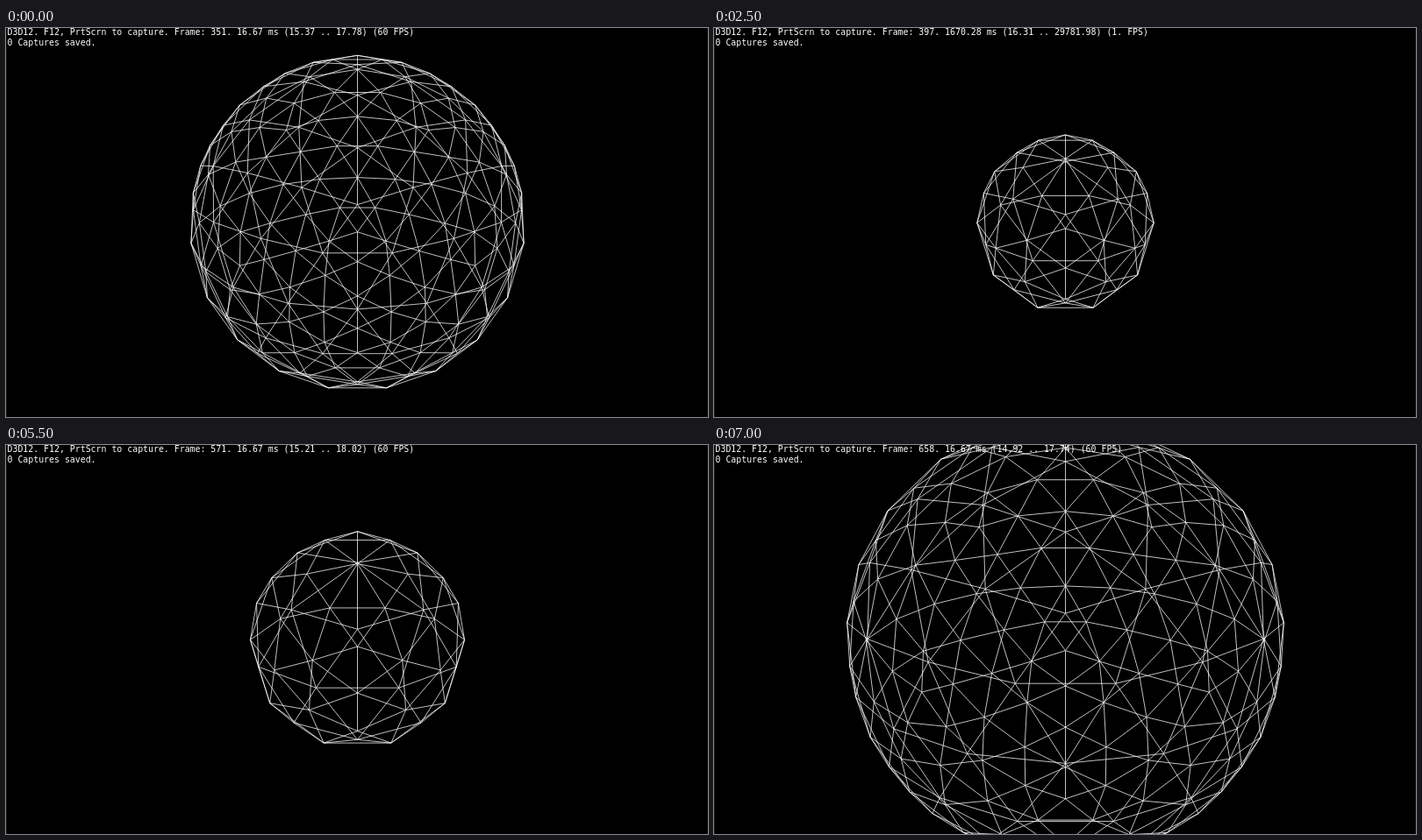
These frames come from a looping animation (800 by 444 pixels, 7100 ms). An HTML page with a canvas:

```html
<!DOCTYPE html>
<html>
<head>
<meta charset="utf-8">
<style>
html, body { margin: 0; width: 100%; height: 100%; overflow: hidden; background: #000; }
canvas { display: block; }
</style>
</head>
<body>
<canvas id="stage" width="800" height="444"></canvas>
<script>
const ctx = document.getElementById('stage').getContext('2d');
const LOOP = 7100, STEP = 100, FOCAL = 536, CX = 400.5, CY = 222.4, TILT = 0.077;

// Camera distance over time: [ms, distance]
const path = [
  [1711, 2.975], [1900, 3.607], [2700, 6.03], [3300, 9.54], [3550, 10], [4300, 8.62],
  [4800, 7.35], [5100, 6.02], [5900, 3.265], [6000, 3.18], [6500, 2.476], [6700, 2.37], [7000, 2.36]
];
// Timing readout, from the given frame count on
const stats = [
  [0, '16.67 ms (15.37 .. 17.78) (60 FPS)'],
  [352, '1670.28 ms (16.31 .. 29781.98) (1. FPS)'],
  [413, '16.41 ms (3.36 .. 17.70) (61. FPS)'],
  [474, '16.67 ms (15.00 .. 18.20) (60 FPS)'],
  [534, '16.67 ms (15.21 .. 18.02) (60 FPS)'],
  [594, '16.67 ms (15.43 .. 17.67) (60 FPS)'],
  [654, '16.67 ms (14.92 .. 17.74) (60 FPS)']
];

// Icosahedron with one vertex facing the viewer
const ring = (start, z) => Array.from({ length: 5 }, (_, k) => {
  const a = (start + 72 * k) * Math.PI / 180, r = 2 / Math.sqrt(5);
  return [r * Math.cos(a), r * Math.sin(a), z];
});
const front = ring(90, 1 / Math.sqrt(5)), back = ring(126, -1 / Math.sqrt(5));
const faces = [];
for (let k = 0; k < 5; k++) {
  const n = (k + 1) % 5;
  faces.push(
    [[0, 0, 1], front[k], front[n]], [[0, 0, -1], back[k], back[n]],
    [front[k], front[n], back[k]], [back[k], back[n], front[n]]
  );
}

// Unique edges of the sphere with each face side split into n parts
function buildEdges(n) {
  const edges = new Map();
  const add = (p, q) => {
    const key = [p, q].map(v => v.map(c => Math.round(c * 1e4) + 0).join()).sort().join('|');
    edges.set(key, [p, q]);
  };
  for (const [a, b, c] of faces) {
    const point = (i, j) => {
      const p = a.map((v, m) => v * (n - i - j) + b[m] * i + c[m] * j);
      const len = Math.hypot(...p);
      return p.map(v => v / len);
    };
    for (let i = 0; i < n; i++) {
      for (let j = 0; j < n - i; j++) {
        const p = point(i, j), q = point(i + 1, j), r = point(i, j + 1);
        add(p, q);
        add(q, r);
        add(r, p);
      }
    }
  }
  return [...edges.values()];
}
const levels = [1, 2, 4].map(buildEdges);

const slope = i => path[i] && path[i + 1]
  ? (path[i + 1][1] - path[i][1]) / (path[i + 1][0] - path[i][0]) : 0;

// Slope at a key, flat at turning points
function tangent(i) {
  const a = slope(i - 1), b = slope(i);
  return a * b > 0 ? 2 * a * b / (a + b) : i ? 0 : b;
}

function distance(t) {
  const last = path.length - 1;
  if (t <= path[0][0]) return path[0][1];
  if (t >= path[last][0]) return path[last][1];
  const i = path.findIndex(p => p[0] > t) - 1;
  const [t0, d0] = path[i], [t1, d1] = path[i + 1];
  const h = t1 - t0, u = (t - t0) / h, v = 1 - u;
  return v * v * (1 + 2 * u) * d0 + u * u * (3 - 2 * u) * d1
    + h * u * v * (v * tangent(i) - u * tangent(i + 1));
}

function project([x, y, z], d) {
  const c = Math.cos(TILT), s = Math.sin(TILT);
  const scale = FOCAL / (d - (z * c - y * s));
  return [CX + x * scale, CY - (y * c + z * s) * scale];
}

function drawSphere(d) {
  ctx.beginPath();
  for (const [p, q] of levels[Math.max(0, 2 - Math.floor(d / 3))]) {
    ctx.moveTo(...project(p, d));
    ctx.lineTo(...project(q, d));
  }
  ctx.stroke();
}

function draw(now) {
  const t = Math.floor(now % LOOP / STEP) * STEP;
  const frame = Math.max(351, Math.floor(362.95 + (t - 1900) * 0.0579));
  const timing = stats.filter(s => s[0] <= frame).pop()[1];
  ctx.fillStyle = '#000';
  ctx.fillRect(0, 0, 800, 444);
  ctx.strokeStyle = '#fff';
  ctx.lineWidth = 0.75;
  drawSphere(distance(t));
  // Faint window border
  ctx.fillStyle = '#1c1c1c';
  ctx.fillRect(0, 0, 1, 444);
  ctx.fillRect(799, 0, 1, 444);
  ctx.fillStyle = '#fff';
  ctx.font = '9.88px "DejaVu Sans Mono", monospace';
  ctx.fillText(`D3D12. F12, PrtScrn to capture. Frame: ${frame}. ${timing}`, 1.5, 8);
  ctx.fillText('0 Captures saved.', 1.5, 20);
}

const start = performance.now();
function tick() {
  draw(performance.now() - start);
  requestAnimationFrame(tick);
}
tick();
</script>
</body>
</html>
```
